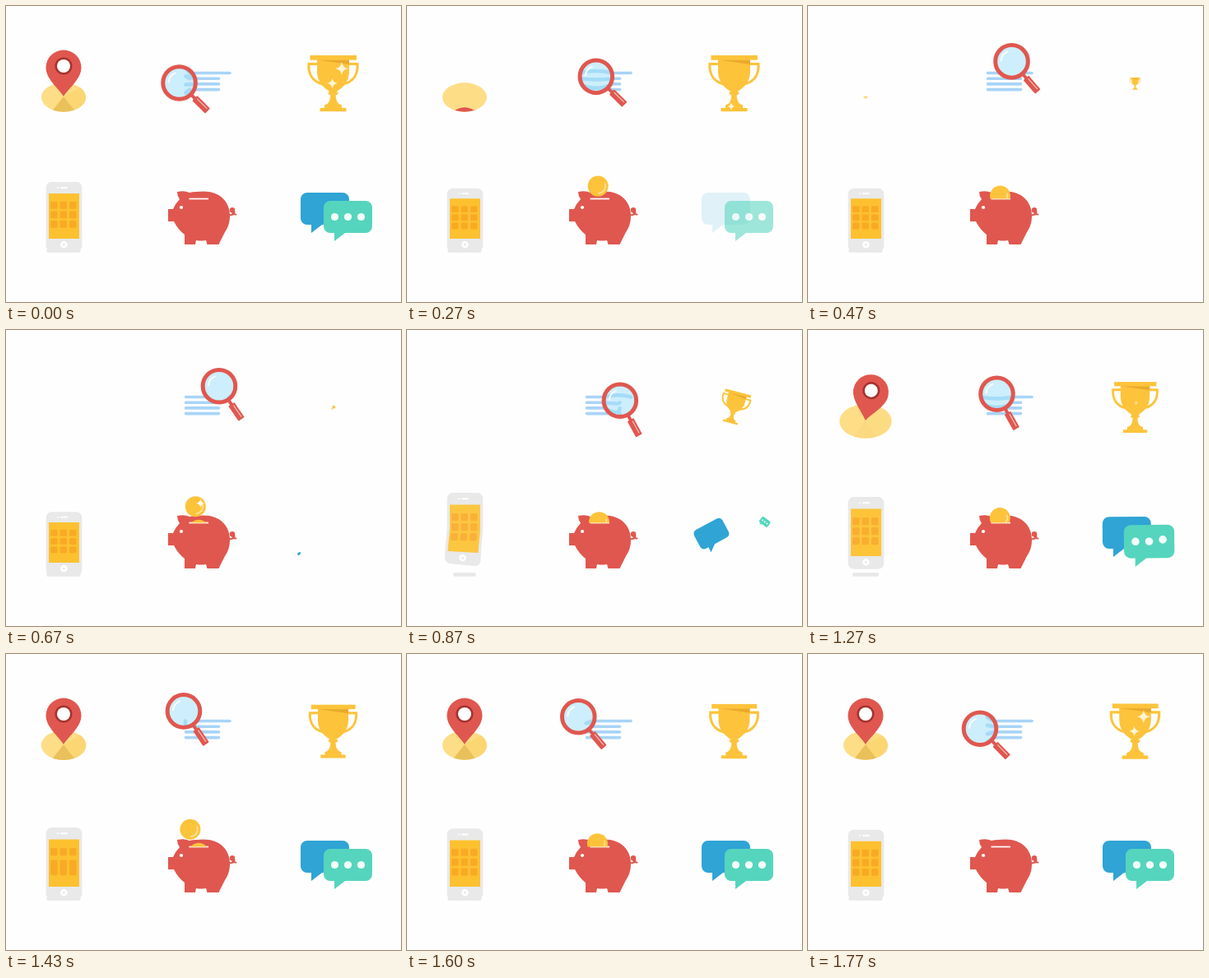
Write an HTML page that moves like this. It is 480 px wide and 360 px high and loops after 1810 ms.

```html
<!DOCTYPE html>
<html lang="en">
<head>
<meta charset="utf-8">
<title>Six icons</title>
<style>
html, body { margin: 0; width: 100%; height: 100%; overflow: hidden; background: #fefefe; }
svg { display: block; width: 480px; height: 360px; }
.red { fill: #e0574f; }
.gold { fill: #fdc33b; }
.line { fill: none; stroke-linecap: round; }
</style>
</head>
<body>
<svg viewBox="0 0 480 360">
  <defs>
    <clipPath id="hole"><path d="M0 0H480V111H97A27 17.7 0 0 1 43 111H0Z"/></clipPath>
    <clipPath id="glass"><circle r="18"/></clipPath>
    <clipPath id="slot"><rect x="190" y="150" width="90" height="84.5"/></clipPath>
    <path id="star" d="M0-8Q1-1 8 0Q1 1 0 8Q-1 1-8 0Q-1-1 0-8Z"/>
    <path id="bubble" d="M-21.5-19.5H21.5a8 8 0 0 1 8 8V11.5a8 8 0 0 1-8 8H-3.5L-16.5 29.5V19.5H-21.5a8 8 0 0 1-8-8V-11.5a8 8 0 0 1 8-8Z"/>
    <path id="ear" class="line" d="M378 70.5H368C367 83 373 92 385 95" stroke="#fdc33b" stroke-width="3.2"/>
  </defs>

  <g id="map">
    <ellipse cx="70" cy="111" rx="27" ry="17.7" fill="#fddd86"/>
    <g id="folds">
      <path d="M70 110L57 126.5Q70 131 83 126.5Z" fill="#e9c05a"/>
      <path d="M70 110L83 126.5Q97 121 97 111Q96 103 90 99Z" fill="#fbd672"/>
    </g>
  </g>
  <g clip-path="url(#hole)"><g id="pin">
    <path class="red" d="M70 110C64 100 48.5 89 48.5 75A21.5 21.5 0 0 1 91.5 75C91.5 89 76 100 70 110Z"/>
    <circle cx="70" cy="73" r="10.6" fill="#a5322e"/>
    <circle cx="70" cy="73" r="8" fill="#fff"/>
  </g></g>

  <g id="text" class="line" stroke="#a8d4f7" stroke-width="3.6"></g>
  <g id="lens">
    <g id="stick">
      <rect class="red" x="20" y="-2" width="9" height="4"/>
      <rect class="red" x="26.5" y="-4.3" width="22" height="8.6" rx="1"/>
      <path d="M29-1.500H46" stroke="#f6c3bf" stroke-width="1.2"/>
    </g>
    <circle r="19.8" fill="#cdeefc"/>
    <g clip-path="url(#glass)"><path id="zoom" class="line" stroke="#a3dcf8" stroke-width="4.5"/></g>
    <path class="line" d="M-13-1A13 13 0 0 1-5-12" stroke="#f4fcff" stroke-width="2.2"/>
    <circle r="19.8" fill="none" stroke="#e0574f" stroke-width="5"/>
  </g>

  <g id="cup">
    <use href="#ear"/><use href="#ear" transform="translate(795) scale(-1 1)"/>
    <path class="gold" d="M378 65H417V80C417 93 408 100 402 104H393C387 100 378 93 378 80Z"/>
    <path d="M378 65.5H417V71Z" fill="#eba92c"/>
    <rect class="gold" x="369.5" y="60" width="56.5" height="5.7"/>
    <ellipse class="gold" cx="397.5" cy="106" rx="6" ry="3"/>
    <path class="gold" d="M394.5 103H400.5C400.500 114 402 119 408 120.500V124H413.5V128.2H381.5V124H387V120.5C393 119 394.5 114 394.5 103Z"/>
    <g id="stars" fill="#fff4d6"></g>
  </g>

  <g id="phone"></g>

  <g class="red">
    <path d="M208 226Q217 224 223 227Q230 225.5 240 225.5C260 225.500 272 238 272 255C272 263 270 269 266 275L258.5 290H244.5L243 285Q237 286 231 285L230 290H217V278Q209 272 204 262H197V247H203Q206 240 211 235Q208 231 208 226Z"/>
    <path class="line" d="M271 254Q279 255 277 248.5Q272.5 253 279.5 253.5" stroke="#e0574f" stroke-width="2"/>
    <circle cx="275" cy="248.3" r="3.2"/>
  </g>
  <circle cx="213" cy="245" r="2.1" fill="#fff"/>
  <path d="M222.5 234.5H246" stroke="#fff" stroke-width="1.7"/>
  <g id="coins" clip-path="url(#slot)"></g>

  <use id="blue" href="#bubble" fill="#2fa4d5"/>
  <g id="teal"><use href="#bubble" fill="#55d5bd"/><g id="dots" fill="#f4fffc"></g></g>
</svg>
<script>
const LOOP = 1810, STEP = 100 / 3, LAST = 53, TAU = Math.PI * 2;
const $ = id => document.getElementById(id);

function add(parent, tag, attrs = {}) {
  const el = document.createElementNS('http://www.w3.org/2000/svg', tag);
  for (const k in attrs) el.setAttribute(k, attrs[k]);
  return parent.appendChild(el);
}
const set = (el, name, value) => el.setAttribute(name, value);
const place = (el, x, y, s, rot = 0) => set(el, 'transform', `translate(${x} ${y}) rotate(${rot}) scale(${s})`);
const turnAt = (el, x, y, dx, dy, s, rot = 0) =>
  set(el, 'transform', `translate(${x + dx} ${y + dy}) rotate(${rot}) scale(${s}) translate(${-x} ${-y})`);

// Easing: all take the time and a start and end in ms.
const clamp = (v, a = 0, b = 1) => Math.max(a, Math.min(b, v));
const mix = (a, b, k) => a + (b - a) * k;
const lin = (t, a, b) => clamp((t - a) / (b - a));
const ramp = (t, a, b) => { const u = lin(t, a, b); return u * u * (3 - 2 * u); };
const easeOut = (t, a, b) => 1 - (1 - lin(t, a, b)) ** 3;
const hump = (t, a, b) => Math.sin(Math.PI * lin(t, a, b));
const settle = (t, a, b, turns) => {
  const u = lin(t, a, b);
  return (1 - u) ** 2 * Math.cos(TAU * turns * u);
};
const cycle = (t, shift = 0, times = 1) => Math.cos(TAU * times * (t - shift) / LOOP);
const pulse = (t, peak, half) => {
  const d = Math.abs((t - peak + LOOP * 1.5) % LOOP - LOOP / 2);
  return clamp(1.4 - 1.4 * d / half);
};

function drawPin(t) {
  const back = t > 700;
  const drop = back ? 0 : 82 * ramp(t, 70, 330);
  const tilt = back ? -64 * settle(t, 1100, 1400, .75) : 0;
  turnAt($('pin'), 70, 110, -tilt / 46, drop, back ? ramp(t, 980, 1110) : 1, tilt);
  turnAt($('map'), 70, 111, back ? 1 - ramp(t, 1130, 1250) : 0, 0,
    back ? 1 - settle(t, 1000, 1500, .75) : 1 - ramp(t, 330, 500));
  set($('folds'), 'opacity', back ? ramp(t, 1230, 1400) : 1 - ramp(t, 70, 250));
}

const lines = [0, 1, 2, 3].map(i => ({ y: 81.5 + 6.7 * i, end: i ? 258.5 : 272 }));
lines.forEach(({ y, end }) => add($('text'), 'path', { d: `M218.5 ${y}H${end}` }));

// The lens swings once sideways and twice up and down per loop.
function drawLens(t) {
  const cx = 234 - 26.5 * cycle(t, -140);
  const cy = 80.5 + 13.5 * cycle(t, 97, 2) + 3 * cycle(t, -170);
  place($('lens'), cx, cy, 1);
  place($('stick'), 0, 0, 1, 53.5 + 10 * cycle(t, 1050));
  let d = '';
  for (const { y, end } of lines) {
    const dy = y - cy, a = Math.max(-20, (217 - cx) * 2), b = Math.min(20, end - cx);
    if (a < b) d += `M${a} ${dy}Q0 ${dy * 2.1} ${b} ${dy}`;
  }
  set($('zoom'), 'd', d);
}

const stars = [[408, 76, 1, 1800], [396.5, 94, .8, 1790], [394, 122, .6, 275], [399, 88, .75, 1130]]
  .map(([x, y, size, peak]) => ({ el: add($('stars'), 'use', { href: '#star' }), x, y, size, peak }));

function drawCup(t) {
  const scale = t < 645 ? 1 - ramp(t, 320, 530) : 1 - Math.exp((645 - t) / 260);
  const tilt = t < 645 ? 0 : 50 * (1 - lin(t, 645, 1130)) ** 2;
  turnAt($('cup'), 397.5, 94.5, 0, 0, scale, tilt);
  for (const { el, x, y, size, peak } of stars) {
    const k = pulse(t, peak, 220);
    place(el, x, y, size * k);
    set(el, 'opacity', k);
  }
}

const shadow = add($('phone'), 'rect', { y: 295.3, height: 4.5, rx: 1, fill: '#e8e8e8' });
const parts = [];
function part(x, y, w, h, r, fill, row = 0) {
  const p = { x, y, w, h, r, row, el: add($('phone'), 'path', { fill }) };
  parts.push(p);
  return p.el;
}
part(48.7, 214, 43.6, 84.5, 7, '#e9e9e9');
part(66, 220, 9, 2, 1, '#fff');
part(62, 220, 2, 2, 1, '#fff');
part(52, 228, 37, 55, .5, '#fdc12f');
for (let i = 0; i < 9; i++) {
  const row = i / 3 | 0;
  part(54 + i % 3 * 11.5, 238 + row * 11.5, 8.6, 8.8, 1.5, '#f9aa25', row);
}
const sheen = part(52, 228, 37, 55, .5, '#fff');
part(66.2, 286, 8.4, 8.4, 4.2, '#fff');
part(69, 288.8, 2.8, 2.8, .6, '#e9e9e9');

// Rounded box as a dense outline, passed point by point through warp.
function outline({ x, y, w, h, r }, warp) {
  const pts = [];
  const corners = [[x + w - r, y + r], [x + w - r, y + h - r], [x + r, y + h - r], [x + r, y + r]];
  corners.forEach(([cx, cy], c) => {
    for (let i = 0; i <= 5; i++) {
      const a = (c - 1 + i / 5) * Math.PI / 2;
      pts.push([cx + r * Math.cos(a), cy + r * Math.sin(a)]);
    }
    const [px, py] = pts[pts.length - 1];
    if (c % 2 === 0) {
      const len = (h - 2 * r) * (c ? -1 : 1);
      for (let i = 1; i < 8; i++) pts.push([px, py + len * i / 8]);
    }
  });
  return 'M' + pts.map(p => warp(...p).map(v => v.toFixed(2)).join(' ')).join('L') + 'Z';
}

// Crouch, then hop while a sideways wave runs up the body.
function drawPhone(t) {
  const crouch = ramp(t, 0, 220) * (1 - ramp(t, 650, 760));
  const hop = hump(t, 740, 1340), lift = 21 * hop;
  const stretch = 1 - .112 * crouch + .045 * (ramp(t, 700, 800) - lin(t, 1430, LOOP));
  const grow = pulse(t, 1430, 150);
  const warp = (x, y) => {
    const v = (y - 214) / 85, u = (x - 70.5) / 22;
    const dx = -3 * hump(t - 260 * (1 - v), 740, 1000);
    const flat = y < 284 ? 284 + (y - 284) * stretch : y;
    return [x + dx, flat - lift - u * dx * (v - .3)];
  };
  for (const p of parts) {
    const box = p.row === 1 ? { ...p, y: p.y + 2.5 * grow, h: p.h + 2 * grow } : p;
    set(p.el, 'd', outline(box, warp));
  }
  set(sheen, 'opacity', .14 * hop);
  const width = 41 - 14 * clamp(lift / 12);
  set(shadow, 'x', 70 - width / 2);
  set(shadow, 'width', width);
}

// start, duration, sideways start
const coins = [[0, 780, 5], [544, 495, 7], [960, 566, 5], [1335, 450, 17]].map(([start, span, side], i) => {
  const el = add($('coins'), 'g');
  add(el, 'circle', { r: 12.5, class: 'gold' });
  add(el, 'path', { class: 'line', d: 'M8.500-3A9 9 0 0 1 1 8.800', stroke: '#ffe296', 'stroke-width': 1.8 });
  const glint = i === 1 && add(el, 'use', { href: '#star', fill: '#fff', transform: 'translate(6 -4) scale(.65)' });
  return { el, start, span, side, glint };
});

function drawCoins(t) {
  for (const { el, start, span, side, glint } of coins) {
    const p = lin(t, start, start + span);
    place(el, 234.3 - side * (1 - p) ** 2, 203 + 47 * p, p < 1 ? Math.min(1, p / .2) : 0);
    if (glint) set(glint, 'opacity', clamp(1.7 - 3 * p));
  }
}

const dots = [-16, 0, 16].map(x => add($('dots'), 'circle', { cx: x, r: 4.6 }));

function drawChat(t) {
  const back = t > 500;
  const k = back ? easeOut(t, 650, 1360) : 1;
  place($('blue'), mix(356, 387.5, k * k), mix(246.5, 278, (1 - k) ** 3), k, -40 * (1 - k ** 3));
  set($('blue'), 'opacity', back ? 1 : 1 - ramp(t, 60, 330));

  const grow = back ? 1 - settle(t, 812, 1400, .5) : 1;
  const tilt = back ? 40 * settle(t, 850, 1430, 1) : 0;
  place($('teal'), mix(440, 415.5, grow), mix(246, 256.5, grow) - .4 * tilt, grow, tilt);
  set($('teal'), 'opacity', back ? 1 : 1 - ramp(t, 130, 430));
  dots.forEach((dot, i) => set(dot, 'cy', -8 * pulse(t, 1020 + 70 * i, 130)));
}

const begin = performance.now();
function tick() {
  const time = (performance.now() - begin) % LOOP;
  const t = Math.min(LAST, Math.floor((time + 3.4) / STEP)) * STEP;
  for (const draw of [drawPin, drawLens, drawCup, drawPhone, drawCoins, drawChat]) draw(t);
  requestAnimationFrame(tick);
}
tick();
</script>
</body>
</html>
```
